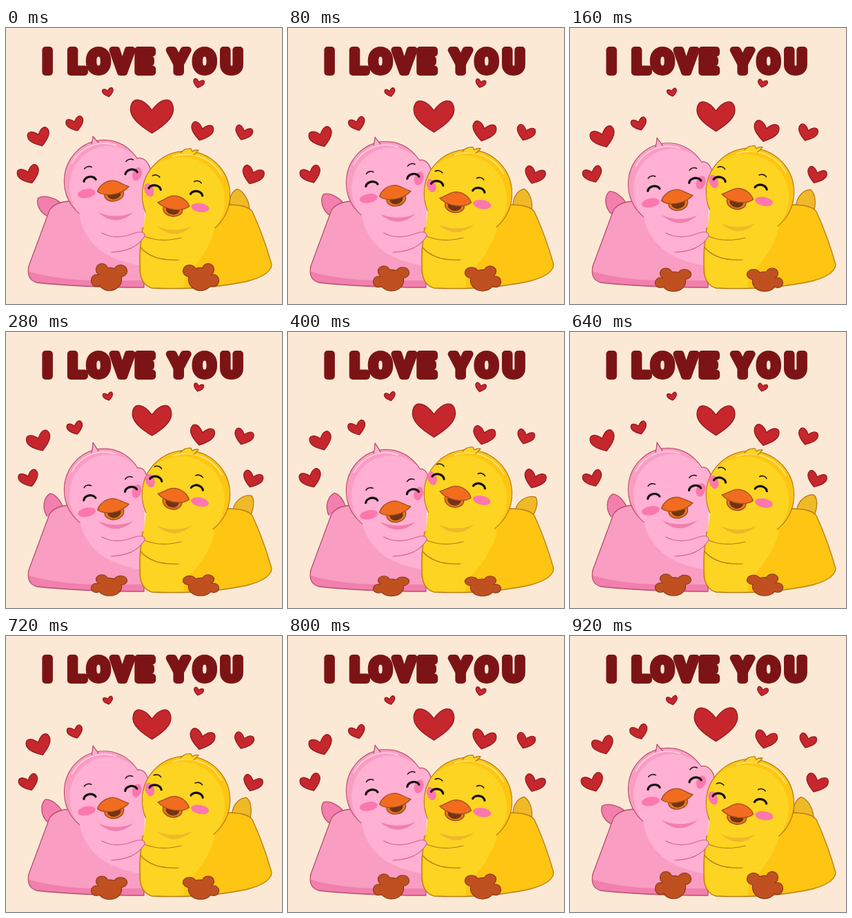
An HTML page with a canvas for the animation above (0.96 s loop, 400x400 px).

```html
<!DOCTYPE html>
<html lang="en">
<head>
<meta charset="utf-8">
<title>I love you</title>
<style>
html, body { margin: 0; width: 100%; height: 100%; overflow: hidden; background: #fbe9d5; }
canvas { display: block; width: 400px; height: 400px; }
</style>
</head>
<body>
<canvas id="stage" width="400" height="400"></canvas>
<script>
const ctx = document.getElementById('stage').getContext('2d');
const LOOP = 960, STEP = 40;

const PINK = {
  side: -1, line: '#b9506b', light: '#ffb0d3', body: '#f99dc2', shade: '#f27fad', rim: '#ffc9e0',
  tail: { x: 72, y: 264, angle: -144 },
  head: { x: 142, y: 222, rx: 57, ry: 59, drop: 8 },
  face: { x: 155, y: 232, tilt: -10, drop: 24, turn: -2 },
  torso: 'M198 270 L92 251 Q71 252 63 264 L33 345 Q29 365 45 369 Q110 376 200 376 Z',
  chest: 'M106 266 Q108 300 140 325 Q165 340 198 345 L202 232 H160 Z',
  tuft: grow => `M-18 5 Q-16 -2 -16 ${-6 - grow} Q-13 ${-2 - grow} -8 3`
};
const GOLD = {
  side: 1, line: '#b97a14', light: '#fdd422', body: '#ffc513', shade: '#efb928', rim: '#ffe267',
  tail: { x: 340, y: 264, angle: -98 },
  head: { x: 261, y: 242, rx: 63, ry: 63, drop: -8 },
  face: { x: 243, y: 254, tilt: 8, drop: -20, turn: 5 },
  torso: 'M198 290 L320 256 Q350 256 357 266 Q374 303 385 343 Q384 358 350 367 Q290 380 212 377 Q193 372 194 345 Q193 320 198 290 Z',
  chest: 'M203 262 H285 L303 291 Q292 325 270 348 Q256 360 258 376 H212 Q196 372 196 345 Q195 320 203 262 Z',
  tuft: () => 'M-8 2 Q-2 -5 7 -4 L9 0 Q13 -3 18 -2 Q14 3 11 5'
};

// x, y, mean width, beat direction
const HEARTS = [
  [211.5, 128, 59, 1], [48.5, 159, 34, -1], [100.5, 139.5, 24, 1], [33.5, 213, 30, 1],
  [283.5, 150.5, 34.5, -1], [344, 152.5, 27, -1], [357, 214, 30, 1], [148, 93.5, 15, 1], [279, 80.5, 15, 1]
];

function paint(path, fill, line, width = 1.3) {
  if (typeof path === 'string') path = new Path2D(path);
  if (fill) { ctx.fillStyle = fill; ctx.fill(path); }
  if (line) { ctx.strokeStyle = line; ctx.lineWidth = width; ctx.stroke(path); }
}

function oval(x, y, rx, ry, angle = 0, from = 0, to = 2 * Math.PI) {
  const path = new Path2D();
  path.ellipse(x, y, rx, ry, angle, from, to);
  return path;
}

// Several overlapping shapes with one common outline.
function merge(paths, fill, line) {
  paths.forEach(path => paint(path, null, line, 2.4));
  paths.forEach(path => paint(path, fill));
}

function group(x, y, degrees, scaleX, scaleY, drawParts) {
  ctx.save();
  ctx.translate(x, y);
  ctx.rotate(degrees * Math.PI / 180);
  ctx.scale(scaleX, scaleY);
  drawParts();
  ctx.restore();
}

function within(path, drawParts) {
  ctx.save();
  ctx.clip(path);
  drawParts();
  ctx.restore();
}

function title() {
  ctx.font = '500 45px Roboto, sans-serif';
  ctx.textAlign = 'center';
  ctx.fillStyle = ctx.strokeStyle = '#7c1416';
  ctx.lineWidth = 10;
  for (const [word, x, spacing] of [['I', 60, 0], ['LOVE', 152, 5], ['YOU', 289, 9]]) {
    ctx.letterSpacing = spacing + 'px';
    ctx.strokeText(word, x + spacing / 2, 64);
    ctx.fillText(word, x + spacing / 2, 64);
  }
}

function heart([x, y, size, direction], beat) {
  const width = size * (1 + .07 * direction * beat);
  const tilt = 20 * Math.tanh((x - 212) / 80);
  group(x, y, tilt, width / 100, width / 100, () => paint(
    'M0 39 C-26 23 -55 2 -49 -23 C-44 -46 -20 -42 0 -14 C20 -42 44 -46 49 -23 C55 2 26 23 0 39 Z',
    '#c5272d', '#981a1e', 130 / width));
}

// Shared face; positive x points away from the other duck.
function face({ face: f, side }, lean) {
  group(f.x, f.y + f.drop * lean, f.tilt + f.turn * lean, side, 1, () => {
    paint(oval(39, 1, 13, 6.5), '#fb77ad');
    paint(oval(-38, -14, 6.5, 10, -.5), '#fb77ad');
    for (const x of [-30, 31]) {
      paint(oval(x, -15, 9, 7, 0, 1.08 * Math.PI, 1.92 * Math.PI), null, '#120c0c', 3.2);
      paint(oval(x - 1, -31, 7, 6, 0, 1.25 * Math.PI, 1.8 * Math.PI), null, '#24130f', 1.6);
    }
    paint(oval(0, 9, 14, 10 + lean), '#ee7420', '#94481a');
    paint(oval(0, 9, 10, 7.5 + lean), '#6f3614');
    paint('M-23 2 C-12 -4 -8 -11 2 -11 C12 -11 20 -5 23 1 C14 11 -10 12 -23 2 Z', '#f26c20', '#a14f1a');
  });
}

function duck(look, lean) {
  const { side, line, light, body, shade, rim, tail, head } = look;
  const y = head.y + head.drop * lean;

  group(tail.x, tail.y, tail.angle + 48 * lean, 1, 1, () =>
    paint('M0 -13 C15 -18 28 -10 31 -1 C28 8 12 14 0 13', shade, line));
  const torso = new Path2D(look.torso);
  paint(torso, body);
  if (look === PINK) within(torso, () => paint('M20 349 Q70 366 140 366 H200 V390 H20 Z', shade));
  paint(torso, null, line);

  const skull = oval(head.x, y, head.rx, head.ry);
  const shapes = [skull];
  if (look === PINK) shapes.push(oval(193, 210 + 10 * lean, 16 - 5 * lean, 21));
  merge(shapes, light, line);
  within(skull, () => {
    paint(skull, body);
    paint(oval(head.x - 7 * side, y + 8, head.rx, head.ry), light);
  });
  group(head.x, y, 0, side, 1, () =>
    paint(oval(0, 0, head.rx - 4, head.ry - 4, 0, -1.9, -.5), null, rim, 2));
  group(head.x, y - head.ry, 0, 1, 1, () => paint(look.tuft(4 * lean), light, line));

  paint(look.chest, light);
  group(head.x - 17 * side, y + 52, 0, 1, 1, () =>
    paint('M-26 -7 Q0 16 26 -7 Q0 4 -26 -7 Z', shade));
  face(look, lean);
}

function arms() {
  paint('M199 301 Q222 312 254 304 M195 318 Q212 338 250 336', null, GOLD.line, 1.2);
  paint('M139 297 C155 306 172 303 187 297 Q202 293 201 302 C190 318 175 324 152 325', PINK.light, '#d5618c', 1.2);
}

function foot(x, side, lean) {
  group(x, 381 + 2 * lean, 0, side, 1 - .26 * lean, () => merge([
    oval(0, -17, 17, 16), oval(19, -15, 7, 8), oval(11, -31, 8, 8), oval(-16, -29, 9, 8)
  ], '#c05020', '#8a3a1a'));
}

function draw(now) {
  const t = Math.floor(now % LOOP / STEP) * STEP;
  const lean = Math.max(0, Math.sin(Math.PI * t / 880));
  const beat = Math.cos(2 * Math.PI * (t + 40) / 480);

  ctx.lineCap = ctx.lineJoin = 'round';
  ctx.fillStyle = '#fbe9d5';
  ctx.fillRect(0, 0, 400, 400);
  title();
  HEARTS.forEach(item => heart(item, beat));
  duck(PINK, lean);
  duck(GOLD, lean);
  arms();
  foot(150, -1, lean);
  foot(282, 1, lean);
}

const start = performance.now();
function tick() {
  draw(performance.now() - start);
  requestAnimationFrame(tick);
}
tick();
</script>
</body>
</html>
```
